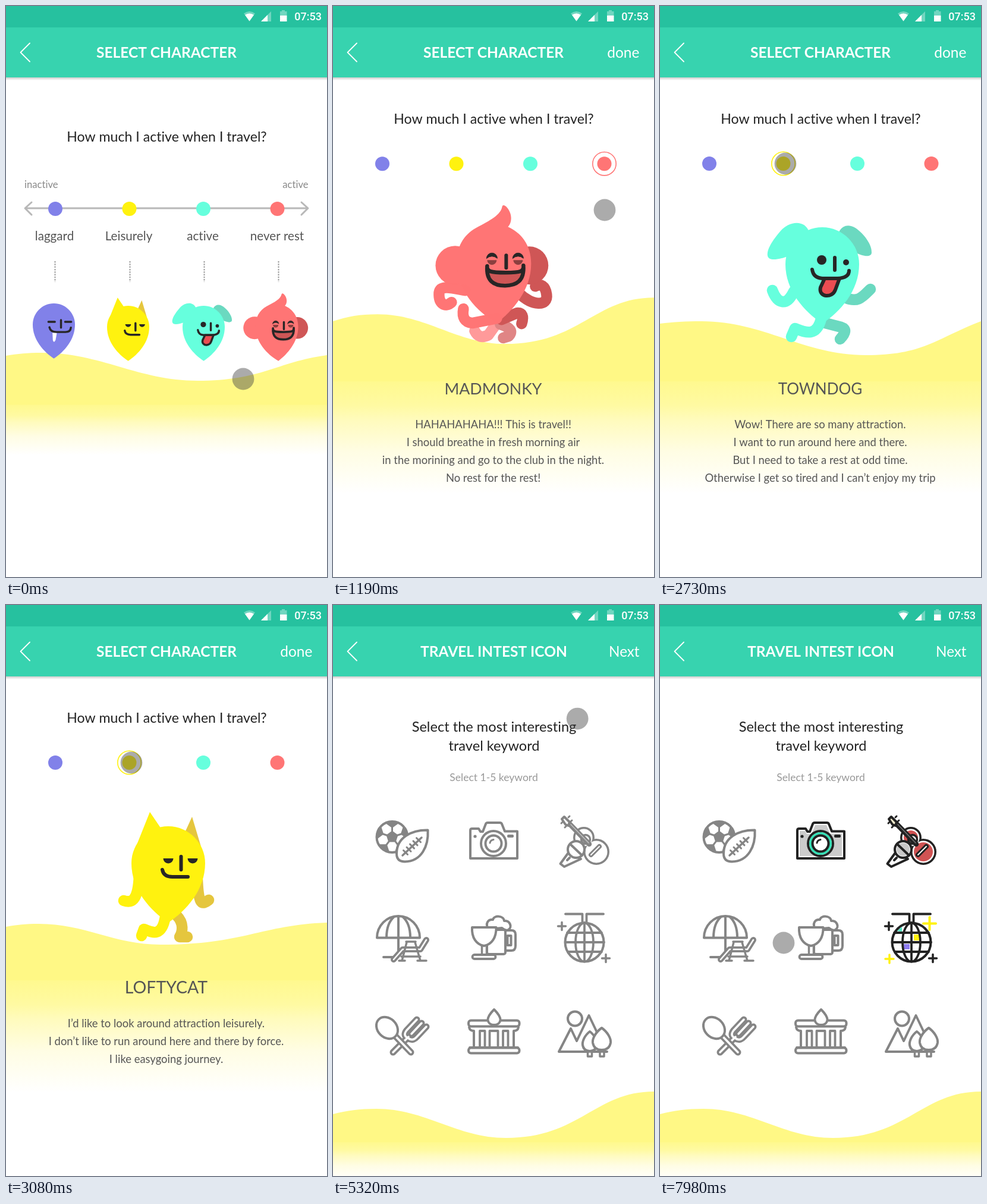
These frames come from a looping animation (540x960 px, 8 s). An HTML page with a canvas:

```html
<!DOCTYPE html>
<html lang="en">
<head>
<meta charset="utf-8">
<title>Select character</title>
<style>
html, body { margin: 0; width: 100%; height: 100%; overflow: hidden; background: #fff; }
canvas { display: block; width: 540px; height: 960px; }
</style>
</head>
<body>
<canvas id="stage" width="540" height="960"></canvas>
<script>
const c = document.getElementById('stage').getContext('2d');
const LOOP = 8000, STEP = 70;
const INK = '#282626', GREY = 133;

const clamp = p => Math.max(0, Math.min(1, p));
const span = (t, a, b) => clamp((t - a) / (b - a));
const cubic = p => p < .5 ? 4 * p ** 3 : 1 - (2 - 2 * p) ** 3 / 2;
const smooth = p => p * p * (3 - 2 * p);
const lerp = (a, b, p) => a + (b - a) * p;

// Progress of the three moves: opening a character, paging, going to keywords
const opening = t => cubic(span(t, 840, 1220));
const scrollAt = t => 2 - cubic(span(t, 1961, 2240)) - cubic(span(t, 2730, 3080));
const leaving = t => cubic(span(t, 4200, 4690));

function path(d, stroke, width, fill) {
  const p = new Path2D(d);
  if (fill) { c.fillStyle = fill; c.fill(p); }
  if (stroke) { c.strokeStyle = stroke; c.lineWidth = width; c.stroke(p); }
}
function disc(x, y, r, fill, stroke, width) {
  c.beginPath();
  c.arc(x, y, r, 0, 7);
  if (fill) { c.fillStyle = fill; c.fill(); }
  if (stroke) { c.strokeStyle = stroke; c.lineWidth = width; c.stroke(); }
}
function box(x, y, w, h, r, stroke, width, fill) {
  c.beginPath();
  c.roundRect(x, y, w, h, r);
  if (fill) { c.fillStyle = fill; c.fill(); }
  if (stroke) { c.strokeStyle = stroke; c.lineWidth = width; c.stroke(); }
}
function text(s, x, y, size, color, align = 'center', weight = 400, family = 'Lato') {
  c.font = `${weight} ${size}px ${family}, sans-serif`;
  c.letterSpacing = '0.01px'; // keeps "ti" from joining
  c.fillStyle = color;
  c.textAlign = align;
  c.fillText(s, x, y);
}
function faded(alpha, draw) {
  if (alpha <= 0) return;
  c.save();
  c.globalAlpha *= alpha;
  draw();
  c.restore();
}

// Hills: left y, crest x y, trough x y, right y, end slope, fade from, fade to
const HILL = {
  start: [588, 60, 583, 322, 630, 587, 12, 670, 755],
  cat: [541, 55, 536, 260, 571, 534, 4, 630, 820],
  dog: [534, 70, 530, 346, 587, 530, 30, 630, 820],
  monkey: [530, 75, 518, 290, 568, 490, 0, 630, 820],
  end: [856, 73, 847, 291, 896, 818, 0, 903, 966]
};
const FADE = [[0, 0], [.01, .08], [.22, .24], [.35, .46], [.63, .78], [1, 1]];
const mixHill = (a, b, p) => a.map((v, i) => lerp(v, b[i], p));
function hill([yl, xc, yc, xt, yt, yr, slope, from, to]) {
  const g = c.createLinearGradient(0, from, 0, to);
  FADE.forEach(([p, v]) => g.addColorStop(p, `rgb(255,${lerp(248, 255, v)},${lerp(133, 255, v)})`));
  const d = xt - xc, e = 540 - xt;
  c.beginPath();
  c.moveTo(0, yl);
  c.bezierCurveTo(xc / 3, lerp(yl, yc, .7), xc * .6, yc, xc, yc);
  c.bezierCurveTo(xc + .38 * d, yc, xt - .38 * d, yt, xt, yt);
  c.bezierCurveTo(xt + .5 * e, yt, 540 - .4 * e, yr + slope, 540, yr);
  c.lineTo(540, 960);
  c.lineTo(0, 960);
  c.fillStyle = g;
  c.fill();
}

const BODY = 'M-62,0C-62,-34-34,-62 0,-62S62,-34 62,0C62,45 30,80 0,100C-30,80-62,45-62,0Z';
const limb = (d, color) => path(d, color, 18.5);
const line = d => path(d, INK, 6);

function laggard() {
  path(BODY, 0, 0, '#8181e9');
  path('M-4,24H9L5,46Q0,56-3,46Z', 0, 0, '#fff');
  line('M-16,-8H3M33,-8H51M21,-13V9M-13,8Q-10,22 8,22H34Q49,22 50,9');
}
function cat(k) {
  const a = '#fff20f', b = '#e5c63e';
  faded(k, () => {
    limb('M49,28C51,72 57,70 68,62', b);
    limb('M14,88C27,101 24,116 19,124H32', b);
    limb('M-49,21C-51,66-63,67-75,63', a);
    limb('M-5,90C-11,126-28,116-41,111L-45,122', a);
  });
  path('M29,-54L40,-78L55,-28Z', 0, 0, b);
  path(BODY, 0, 0, a);
  path('M-55,-26L-31,-86L-12,-58Z', 0, 0, a);
  path('M-8.5,-8H8.5A8.5,8.5 0 0 1-8.5,-8ZM32.5,-8H49.5A8.5,8.5 0 0 1 32.5,-8Z', 0, 0, INK);
  line('M21.5,-11V11M-10,11Q-8,23 7,23H33');
}
function dog(k) {
  const a = '#66ffdd', b = '#6bd9c0';
  faded(k, () => {
    limb('M38,56C60,66 68,55 81,42', b);
    limb('M5,99L32,106Q45,110 30,126', b);
    limb('M-48,46C-60,72-76,66-84,44', a);
    limb('M-2,92C-10,124-30,114-46,108L-52,122', a);
  });
  path('M28,-54C36,-70 52,-66 62,-56C74,-46 84,-30 83,-19C82,-10 66,-14 55,-20Z', 0, 0, b);
  path(BODY, 0, 0, a);
  path('M-22,-54C-30,-76-56,-72-70,-56C-84,-40-94,-24-92,-14C-90,-4-72,-8-55,-14Z', 0, 0, a);
  disc(-1, -7, 8, INK);
  disc(40, -3, 5, INK);
  path('M4,24L-3,39C-7,56 17,58 22,43L29,24Z', INK, 6, '#ea4d52');
  line('M21,-11V10M-17,9Q-15,23 0,24H26Q45,23 45,11');
}
function monkey(k) {
  const a = '#ff7575', b = '#cf5656';
  faded(k, () => {
    limb('M-33,113Q-26,128-10,120L0,106', '#ff9a9a');
    limb('M10,102Q36,110 24,122L15,125', '#e08585');
    limb('M41,49C64,72 91,72 88,52C86,37 78,33 69,38', b);
    limb('M12,94L38,83Q52,82 46,101', b);
  });
  disc(59, 3, 32, b);
  disc(-66, 3, 33, a);
  path('M-63,0C-64,-28-52,-48-31,-60C-6,-73 10,-82 13,-95Q14,-101 20,-96C30,-86 31,-70 23,-62' +
    'C45,-52 62,-32 62,0C62,45 30,80 4,100C-30,80-63,45-63,0Z', 0, 0, a);
  faded(k, () => {
    limb('M-49,45C-71,41-91,35-93,49C-94,67-83,75-72,65', a);
    limb('M4,92L-37,100Q-56,98-52,76', a);
  });
  for (const x of [-4, 40]) {
    path(`M${x - 9},-9A9,9 0 0 1 ${x + 9},-9Q${x},-16 ${x - 9},-9Z`, INK, 1, INK);
    path(`M${x - 8},-6H${x + 8}A8,8 0 0 1 ${x - 8},-6Z`, 0, 0, '#8b3f3f');
  }
  path('M-12,4C-13,13-7,15 19,15C45,15 50,13 49,3C51,29 37,37 18,37C-1,37-14,29-12,4Z', INK, 6.5, b);
  line('M20,-14V7');
}
function figure(draw, x, y, scale, limbs) {
  c.save();
  c.translate(x, y);
  c.scale(scale, scale);
  draw(limbs);
  c.restore();
}

const PAGES = [
  { draw: cat, x: 273, y: 434, hill: HILL.cat, name: 'LOFTYCAT', size: 28.5, lines: [
    'I’d like to look around attraction leisurely.',
    'I don’t like to run around here and there by force.',
    'I like easygoing journey.'] },
  { draw: dog, x: 273, y: 434, hill: HILL.dog, name: 'TOWNDOG', size: 26, lines: [
    'Wow! There are so many attraction.',
    'I want to run around here and there.',
    'But I need to take a rest at odd time.',
    'Otherwise I get so tired and I can’t enjoy my trip'] },
  { draw: monkey, x: 271, y: 433, hill: HILL.monkey, name: 'MADMONKY', size: 26.7, lines: [
    'HAHAHAHAHA!!! This is travel!!',
    'I should breathe in fresh morning air',
    'in the morining and go to the club in the night.',
    'No rest for the rest!'] }
];
function caption(p) {
  text(p.name, 269.5, 653, p.size, '#555');
  p.lines.forEach((s, i) => text(s, 269.5, 709.5 + 30 * i, 18.4, '#555'));
}
function eachPage(scroll, draw) {
  PAGES.forEach((p, i) => {
    const x = (i - scroll) * 540;
    if (Math.abs(x) >= 540) return;
    c.save();
    c.translate(x, 0);
    draw(p);
    c.restore();
  });
}

const DOTS = [[83, '#8181e9'], [207.5, '#fff20f'], [332, '#66ffdd'], [456.5, '#ff7575']];
function dots(y, chosen) {
  DOTS.forEach(([x, color], i) => {
    disc(x, y, 12, color);
    if (i === chosen) disc(x, y, 19.7, null, color, 1.6);
  });
}

function scaleBar() {
  path('M33,340H507M43,330L32,340L43,351M497,330L508,340L497,351', '#b8b8b8', 3);
  text('inactive', 31, 306, 16.6, '#888', 'left');
  text('active', 508.5, 306, 16.6, '#888', 'right');
  ['laggard', 'Leisurely', 'active', 'never rest'].forEach((s, i) => {
    text(s, [81.5, 206.5, 331, 456][i], 393.5, 20.6, '#555');
    c.save();
    c.setLineDash([2.5, 1.8]);
    c.lineCap = 'butt';
    const x = 82.5 + 125 * i + (i ? 1 : 0);
    path(`M${x},429V464`, '#999', 2);
    c.restore();
  });
}

function chooser(t) {
  const k = opening(t);
  const chosen = t < 900 ? -1 : t < 1961 ? 3 : t < 2730 ? 2 : 1;
  if (k < 1) {
    const m = PAGES[2];
    faded(1 - 2 * k, scaleBar);
    faded(1 - 1.5 * k, () => {
      figure(laggard, 80.5, 535.5, .573, 0);
      figure(cat, 205.5, 539.5, .573, 0);
      figure(dog, 332.5, 539.5, .573, 0);
    });
    figure(monkey, lerp(456, m.x, k), lerp(539.5, m.y, k), lerp(.573, 1, k), k);
    faded(k, () => caption(m));
  } else {
    eachPage(scrollAt(t), p => {
      figure(p.draw, p.x, p.y, 1, 1);
      caption(p);
    });
  }
  dots(lerp(341, 265, k), chosen);
  text('How much I active when I travel?', 270.5, lerp(228, 198, k), 23.1, '#222');
}

function hills(t) {
  if (t < 1260) hill(mixHill(HILL.start, HILL.monkey, opening(t)));
  else if (t >= 4200) hill(mixHill(HILL.cat, HILL.end, leaving(t)));
  else eachPage(scrollAt(t), p => hill(p.hill));
}

const tone = k => { const v = Math.round(lerp(GREY, 34, k)); return `rgb(${v},${v},${v})`; };
function tube(d, color, outer, inner) {
  path(d, color, outer);
  path(d, '#fff', inner);
}
function pentagon(x, y, r, a) {
  c.beginPath();
  for (let i = 0; i < 5; i++) c.lineTo(x + r * Math.cos(a + i * 1.2566), y + r * Math.sin(a + i * 1.2566));
  c.closePath();
  c.fill();
}
const plus = (x, y, r, color, w) => path(`M${x - r},${y}h${2 * r}M${x},${y - r}v${2 * r}`, color, w);

function sports() {
  const g = tone(0), x = 99.5, y = 390;
  c.save();
  disc(x, y, 26.5, '#fff');
  c.clip();
  c.fillStyle = g;
  pentagon(x, y, 10.5, -Math.PI / 2);
  for (let i = 0; i < 5; i++) {
    const a = -Math.PI / 2 + i * 1.2566, u = Math.cos(a), v = Math.sin(a);
    c.fillStyle = g;
    pentagon(x + 27 * u, y + 27 * v, 12, a + Math.PI);
    path(`M${x + 9 * u},${y + 9 * v}L${x + 17 * u},${y + 17 * v}`, g, 3);
  }
  c.restore();
  disc(x, y, 26, null, g, 4);
  path('M159.5,378.5C132,378 107,391 107,418Q107,431.5 121,431.5C149,431 161,405 159.5,378.5Z', g, 4, '#fff');
  path('M117,421L149,391', g, 3.5);
  for (let i = 0; i < 5; i++) {
    const px = 122 + 5.5 * i, py = 416 - 5.2 * i;
    path(`M${px - 3.5},${py - 3.5}l7,7`, g, 3);
  }
}
function camera(k) {
  const g = tone(k);
  path('M231,426V379Q231,376 234,376H245L248,381H252L257,368Q258,366 260,366H281Q283,366 284,368L289,380.5H310V426Z', g, 4, '#fff');
  faded(k, () => path('M235,422V380H244L247,385H255L261,370H280L286,384.5H306V422Z', 0, 0, '#cbcbcb'));
  disc(270, 401, 21, '#fff', g, 4);
  faded(k, () => disc(270, 401, 17, null, '#35dfb5', 4));
  disc(270, 401, 13.5, '#fff', g, 4);
  path('M264,400Q265,395 270,394.5', g, 3);
  disc(239, 389, 2.6, g);
  box(293, 386, 11, 5, 2, null, 0, g);
}
function guitar(k) {
  const g = tone(k), bouts = [[443, 415, 20], [422, 391, 16]];
  bouts.forEach(b => disc(...b, null, g, 4));
  bouts.forEach(b => disc(b[0], b[1], b[2] - 1.5, '#fff'));
  faded(k, () => bouts.forEach(b => disc(b[0], b[1], b[2] - 4, '#d05353')));
  disc(425, 394, 7.5, '#fff', g, 3.5);
  path('M396,366L431,402', g, 8.5);
  path('M400,369L430,400', k > .5 ? '#777' : '#c2c2c2', 1.5);
  path('M385,360L389,356L398,365L396,371L391,369Z', g, 4, k > .5 ? '#f7efcf' : '#fff');
  path('M384,367L387,364M390,374L393,371M396,357L398,355M400,364L402,362', g, 3);
  tube('M434,420L448,406', g, 8, 2);
  path('M397,415L382.5,435L389,440L417,427Z', g, 4, '#fff');
  disc(409, 411, 14, '#fff', g, 4);
  faded(k, () => disc(409, 411, 11, '#c8c8c8'));
  path('M399,402L419,421', g, 4);
  path('M394,429L398,425', g, 4);
}
function beach() {
  const g = tone(0);
  path('M74,559.5A35.5,36 0 0 1 146,559.5ZM90,559Q90,535 103,524M130,559Q130,535 117,524M110,524V590M85,592H100', g, 4);
  tube('M102,596L117,579H147L157,563', g, 10, 2.5);
  path('M123,566H139M124,567L116,598M138,567L147,598M115,591H147M111,598H121M142,598H157', g, 3.5);
}
function drinks() {
  const g = tone(0);
  box(259, 546, 31, 41, 3, g, 4, '#fff');
  path('M290,547H300Q307,547 307,554V573Q307,581 300,581H290M293.5,556H299.5V572H293.5Z', g, 4);
  path('M262,545C255,536 261,528 269,529C271,521 287,522 288,531C298,530 302,542 295,546C289,549 285,543 284,543Z', g, 4, '#fff');
  path('M234,542H274.5C275,559 267,571 254,573C241,571 233,559 234,542Z', g, 4, '#fff');
  path('M250.5,573V587M258.5,573V587', g, 3.5);
  box(234.5, 588, 39, 7, 3.5, g, 3.8, '#fff');
}
function disco(k) {
  const g = tone(k);
  disc(423, 567, 32.5, '#fff', g, 4);
  faded(k, () => {
    path('M427,554H437V564H427Z', 0, 0, '#fff20f');
    path('M409,570H420V579H409Z', 0, 0, '#8f7df0');
    path('M399,548L407,541V549Z', 0, 0, '#4fe3c0');
    plus(453.5, 535.5, 10.5, '#fff20f', 4);
    plus(386, 595, 7, '#fff20f', 3.5);
  });
  c.beginPath();
  c.ellipse(423, 567, 15, 32.5, 0, 0, 7);
  c.strokeStyle = g;
  c.lineWidth = 3.8;
  c.stroke();
  path('M391,519.5H419.5V533M426.5,533V519.5H455M423,534V599M394,551H452M391,567H456M395,583H452', g, 3.8);
  plus(385, 540, 6.5, g, 3.5);
  plus(459, 594, 6.5, g, 3.5);
}
function cutlery() {
  const g = tone(0);
  tube('M141,697L124,715Q117,724 126,728Q134,734 141,726L157,709M149,703L132,721M127,726L101,752', g, 11, 3.5);
  tube('M106,726L131,752', g, 11, 3.5);
  c.save();
  c.translate(91, 711);
  c.rotate(.8);
  c.beginPath();
  c.ellipse(0, 0, 20, 16, 0, 0, 7);
  c.fillStyle = '#fff';
  c.fill();
  c.lineWidth = 4;
  c.strokeStyle = g;
  c.stroke();
  c.restore();
}
function museum() {
  const g = tone(0);
  box(228, 698.5, 85.5, 10, 4, g, 4);
  path('M229,710Q230,716 237,716V744M312,710Q311,716 304,716V744M230,744H311', g, 4);
  box(247, 716, 8.5, 28, 0, g, 3.8);
  box(263.5, 716, 14, 28, 0, g, 3.8);
  box(286, 716, 8.5, 28, 0, g, 3.8);
  box(228, 744.5, 85.5, 9, 4, g, 4, '#fff');
  path('M271,680C278,687 282,693 281.5,698Q280,706 271,706Q262,706 260.5,698C260,693 264,687 271,680Z', g, 4, '#fff');
}
function nature() {
  const g = tone(0);
  disc(407, 695.5, 12, null, g, 4);
  path('M461,751H380L400,712L410,733L430.5,690L452,735', g, 4);
  path('M428.5,751H435.5V759H428.5ZM449,751H456V759H449Z', g, 3.5, '#fff');
  path('M432,717C423,724 419,734 420,740Q422,750 432,750Q442,750 444,740C445,734 441,724 432,717Z', g, 4, '#fff');
  path('M452,711C442,718 436,729 437,736Q439,748 452,748Q465,748 467,736C468,729 462,718 452,711Z', g, 4, '#fff');
}

function keywords(t) {
  text('Select the most interesting', 271, 212.5, 23.6, '#222');
  text('travel keyword', 271, 244.5, 23.6, '#222');
  text('Select 1-5 keyword', 270.5, 295.5, 17.5, '#999');
  sports();
  camera(span(t, 6030, 6130));
  guitar(span(t, 6650, 6750));
  beach();
  drinks();
  disco(span(t, 7370, 7470));
  cutlery();
  museum();
  nature();
}

function header(t, swap) {
  const g = c.createLinearGradient(0, 120, 0, 125);
  g.addColorStop(0, 'rgba(0,0,0,.2)');
  g.addColorStop(1, 'rgba(0,0,0,0)');
  c.fillStyle = g;
  c.fillRect(0, 120, 540, 5);
  c.fillStyle = '#37d3af';
  c.fillRect(0, 36, 540, 84);
  c.fillStyle = '#26c19f';
  c.fillRect(0, 0, 540, 36);
  const pale = 'rgba(255,255,255,.35)';
  path('M409.5,25.5L400,12.5Q409.5,5.5 419,12.5Z', 0, 0, pale);
  path('M409.5,25.5L402,15Q409.5,10 417,15Z', 0, 0, '#fff');
  path('M429,26H446V9Z', 0, 0, pale);
  path('M429,26H440V15Z', 0, 0, '#fff');
  path('M461,9H464V7H469V9H472.5V16H461Z', 0, 0, pale);
  c.fillStyle = '#fff';
  c.fillRect(461, 16, 11.5, 10);
  text('07:53', 531, 24, 18, '#fff', 'right', 500, 'Roboto');
  path('M40,62.5L24.5,78L40,93.5', '#fff', 1.8);
  faded(1 - swap, () => {
    text('SELECT CHARACTER', 270, 87, 24.5, '#fff', 'center', 700);
    faded(span(t, 840, 1190), () => text('done', 515.5, 87, 24.5, '#fff', 'right'));
  });
  faded(swap, () => {
    text('TRAVEL INTEST ICON', 270.5, 87, 24.5, '#fff', 'center', 700);
    text('Next', 515.5, 87, 24.2, '#fff', 'right');
  });
}

const TOUCH = [
  [0, 399, 627], [840, 457, 343], [1610, 457, 343], [1890, 332, 265], [2380, 332, 265],
  [2660, 211, 265], [3640, 211, 265], [4130, 492, 76], [4830, 492, 76], [6030, 270, 392],
  [6160, 270, 392], [6510, 421, 405], [6790, 421, 405], [7280, 423, 568], [7490, 423, 568],
  [7980, 208, 568]
];
function touch(t) {
  if (t >= 6580 && t < 6790) return;
  const i = Math.max(1, TOUCH.findIndex(p => p[0] >= t));
  const a = TOUCH[i - 1], b = TOUCH[i], p = smooth(span(t, a[0], b[0]));
  disc(lerp(a[1], b[1], p), lerp(a[2], b[2], p), 18.4, 'rgba(69,69,69,.45)');
}

function draw(now) {
  const t = Math.floor(now % LOOP / STEP) * STEP;
  const swap = leaving(t);
  c.fillStyle = '#fff';
  c.fillRect(0, 0, 540, 960);
  c.lineCap = c.lineJoin = 'round';
  hills(t);
  faded(1 - swap, () => chooser(t));
  faded(swap, () => keywords(t));
  header(t, swap);
  touch(t);
}

const begin = performance.now();
function tick() {
  draw(performance.now() - begin);
  requestAnimationFrame(tick);
}
tick();
</script>
</body>
</html>
```
